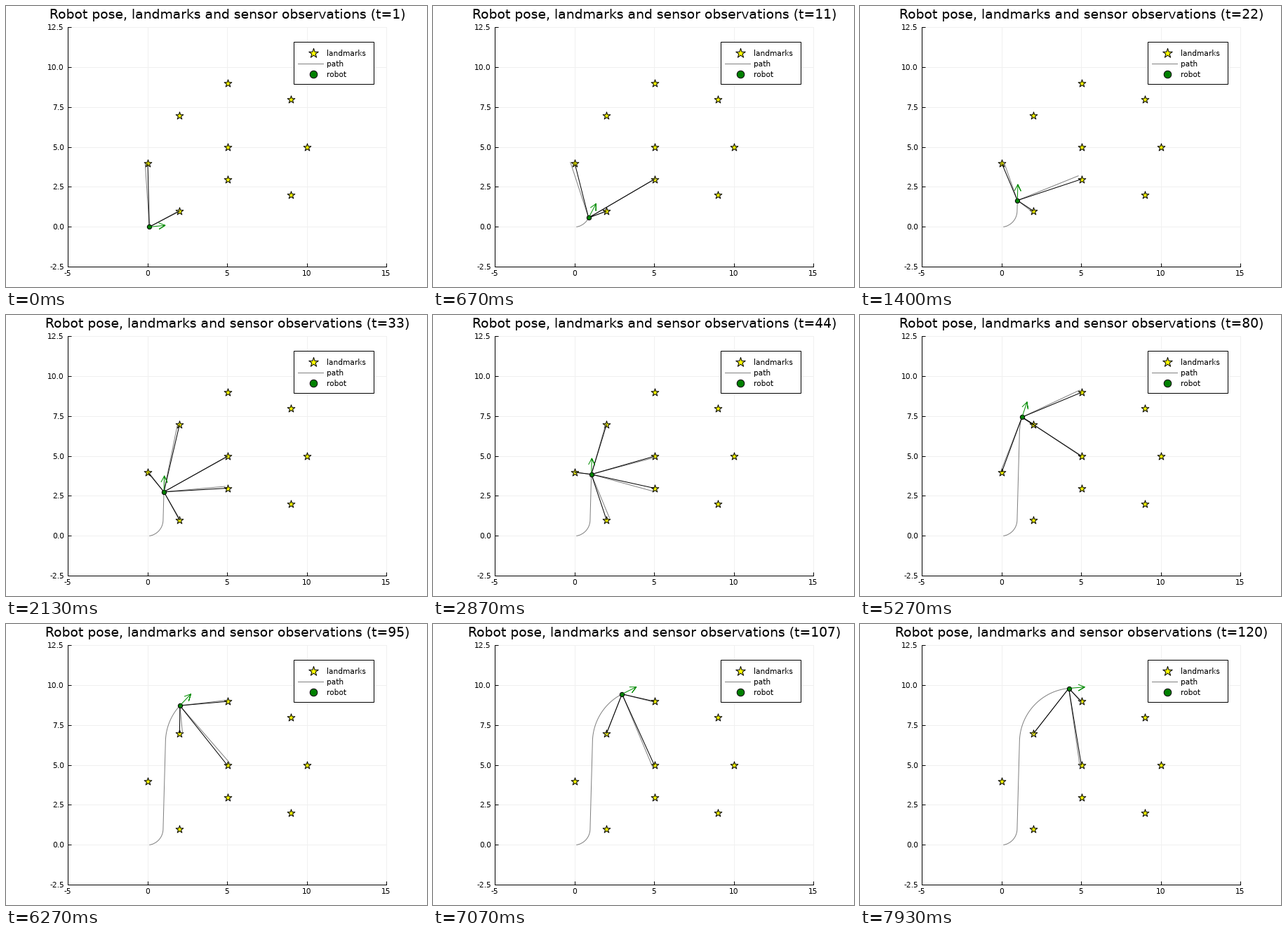
Write a matplotlib script that moves like this. It is 600 px wide and 400 px high and loops after 8 s.

```python
import numpy as np
import matplotlib.pyplot as plt
from matplotlib.animation import FuncAnimation
from matplotlib.patches import Rectangle

plt.rcParams["text.hinting"] = "default"

W, H, DPI = 600, 400, 100
PX = 72 / DPI                      # points per pixel
STEPS, LOOP, TICK = 120, 8000, 20
LEFT, RIGHT, TOP, BOTTOM = 88.5, 542.5, 30.5, 371.5
SENSOR_RANGE = 5.0
SMALL, BIG = 10.68 * PX, 18.72 * PX

LANDMARKS = np.array([(2, 1), (0, 4), (2, 7), (9, 2), (10, 5),
                      (9, 8), (5, 5), (5, 3), (5, 9)], float)


def to_px(p):
    p = np.asarray(p, float)
    return np.stack([202 + 22.7 * p[..., 0], 314.7 - 22.72 * p[..., 1]], -1)


def unit(angle):
    return np.stack([np.cos(angle), np.sin(angle)], -1)


def drive():
    """Left turn, straight run, then a wide right turn."""
    t = np.arange(1, STEPS + 1)
    left = np.minimum(0.0985 * t, 1.5435)
    heading = left - 0.0293 * np.maximum(t - 70, 0)
    course = left - 0.0293 * np.maximum(t - 71, 0)
    return np.cumsum(0.1 * unit(course), axis=0), heading


def observe(step, pos):
    """True and noisily sensed positions of the landmarks in range."""
    rng = np.random.default_rng(step)
    delta = LANDMARKS - pos
    dist = np.hypot(*delta.T)
    bearing = np.arctan2(delta[:, 1], delta[:, 0]) + rng.normal(0, 0.05, len(dist))
    reach = dist + rng.normal(0, 0.1, len(dist))
    near = dist < SENSOR_RANGE
    sensed = pos + reach[:, None] * unit(bearing)
    return to_px(LANDMARKS[near]), to_px(sensed[near])


def segments(pairs):
    """Separate segments as one polyline with gaps."""
    pts = [p for a, b in pairs for p in (a, b, (np.nan, np.nan))]
    return np.array(pts).T


def arrow(start, heading, length=22.7, barb=10, spread=0.46):
    def ray(angle, size):
        return size * unit(angle) * (1, -1)
    tip = start + ray(heading, length)
    ends = [tip - ray(heading + s, barb) for s in (spread, -spread)]
    return np.array([start, tip, ends[0], tip, ends[1]]).T


fig = plt.figure(figsize=(W / DPI, H / DPI), dpi=DPI, facecolor="white")
ax = fig.add_axes([0, 0, 1, 1])
ax.set_xlim(0, W)
ax.set_ylim(H, 0)
ax.axis("off")


def line(xy=((), ()), color="black", z=1):
    return ax.plot(*xy, color=color, lw=PX, zorder=z, snap=False,
                   solid_capstyle="butt")[0]


def marker(xy, shape, size, color, z):
    return ax.scatter(*np.transpose(xy), s=(size * PX) ** 2, marker=shape,
                      c=color, edgecolors="black", linewidths=PX, zorder=z)


def label(x, y, text, ha="center", size=SMALL):
    return ax.text(x, y, text, ha=ha, va="baseline", fontsize=size,
                   family="DejaVu Sans", color="black", zorder=11)


# Grid, ticks and axes
grid = []
frame = [((LEFT, TOP), (LEFT, BOTTOM + 0.5)), ((LEFT, BOTTOM), (RIGHT, BOTTOM))]
for v in range(-5, 16, 5):
    x = np.floor(to_px((v, 0))[0]) + 0.5
    grid.append(((x, TOP), (x, BOTTOM)))
    frame.append(((x, BOTTOM), (x, BOTTOM - 5)))
    label(x - 0.5, 384, str(v))
for v in np.arange(-2.5, 13, 2.5):
    y = np.floor(to_px((0, v))[1]) + 0.5
    grid.append(((LEFT, y), (RIGHT, y)))
    frame.append(((LEFT, y), (LEFT + 5, y)))
    label(83, y + 3.9, f"{v:.1f}", "right")
line(segments(grid), "#f0f0f0", 0)
line(segments(frame))

# Legend
ax.add_patch(Rectangle((410.5, 51.5), 114, 60, fc="white", ec="black",
                       lw=PX, zorder=9, snap=False))
marker([(437.5, 66.8)], "*", 14.2, "yellow", 10)
line(((416, 453), (82.5, 82.5)), "gray", 10)
marker([(437.5, 97.2)], "o", 10.5, "green", 10)
for row, name in enumerate(("landmarks", "path", "robot")):
    label(457.3, 70.7 + 15.2 * row, name, "left")

title = label(315.5, 18, "", size=BIG)
marker(to_px(LANDMARKS), "*", 11.3, "yellow", 2)
path = line(color="gray", z=3)
sensed = line(color="gray", z=4)
actual = line(z=5)
robot = marker([(0, 0)], "o", 6.3, "green", 6)
pointer = line(color="#008c00", z=7)

POS, HEADING = drive()
TRACK = to_px(POS)


def draw(k):
    # Steps last 66.7 ms; the lead places each change on the clock tick before it
    i = int((k * TICK + 14) * STEPS / LOOP)
    here = TRACK[i]
    true, seen = observe(i + 1, POS[i])
    title.set_text(f"Robot pose, landmarks and sensor observations (t={i + 1})")
    path.set_data(*TRACK[:i + 1].T)
    actual.set_data(*segments([(here, p) for p in true]))
    sensed.set_data(*segments([(here, p) for p in seen]))
    robot.set_offsets([here])
    pointer.set_data(*arrow(here, HEADING[i]))
    return title, path, sensed, actual, robot, pointer


anim = FuncAnimation(fig, draw, frames=LOOP // TICK, interval=TICK,
                     init_func=lambda: draw(0), repeat=True, repeat_delay=0)
plt.show()
```
